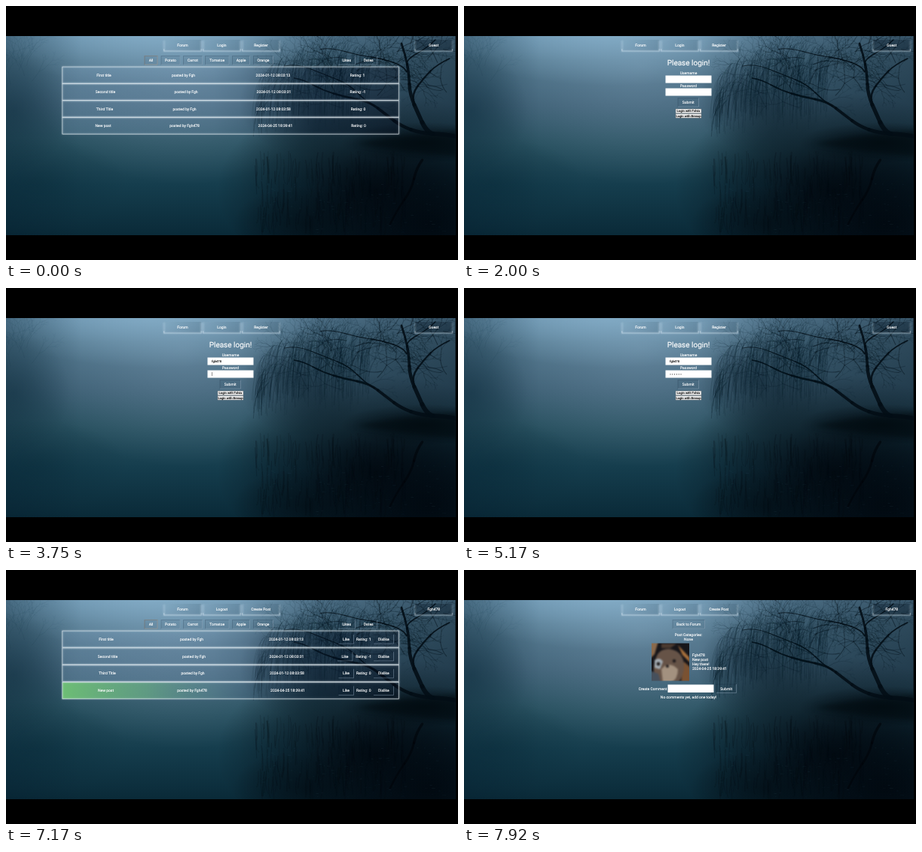
Write an HTML page with a canvas that moves like this. It is 600 px wide and 338 px high and loops after 8000 ms.

```html
<!DOCTYPE html>
<html lang="en">
<head>
<meta charset="utf-8">
<title>Forum demo</title>
<style>
html, body { margin: 0; width: 100%; height: 100%; overflow: hidden; background: #000; }
canvas, svg { position: absolute; left: 0; top: 0; width: 600px; height: 338px; }
text { font-family: Roboto, "Liberation Sans", sans-serif; font-size: 5px;
  text-rendering: geometricPrecision; white-space: pre; stroke-width: .14px; }
.soft { filter: blur(.9px); }
.faint { filter: blur(.5px); }
</style>
</head>
<body>
<canvas id="lake" width="600" height="338"></canvas>
<svg id="ui" viewBox="0 0 600 338">
  <defs>
    <linearGradient id="row">
      <stop offset="0" stop-color="#86a9c8" stop-opacity=".26"/>
      <stop offset=".45" stop-color="#7c9cbc" stop-opacity=".2"/>
      <stop offset=".75" stop-color="#0a1830" stop-opacity=".25"/>
      <stop offset="1" stop-color="#020818" stop-opacity=".35"/>
    </linearGradient>
    <linearGradient id="own">
      <stop offset="0" stop-color="#6fc274" stop-opacity=".95"/>
      <stop offset=".25" stop-color="#68b080" stop-opacity=".65"/>
      <stop offset=".55" stop-color="#5c8a94" stop-opacity="0"/>
    </linearGradient>
    <linearGradient id="btn">
      <stop offset="0" stop-color="#9dbdd4" stop-opacity=".12"/>
      <stop offset="1" stop-color="#0c2436" stop-opacity=".12"/>
    </linearGradient>
    <clipPath id="photo"><rect x="249" y="97.5" width="50" height="50"/></clipPath>
  </defs>
</svg>
<script>
const LOOP = 8000;
const USER = 'Fgh478';
const LOGIN_AT = 1830, MEMBER_AT = 5920, POST_AT = 7250;
const NAME_AT = 2500, PASS_FOCUS = 3500, PASS_AT = 4080, KEY = 150;

/* ---------- misty lake ---------- */
let seed = 7;
function rnd() {
  seed = (seed + 0x6D2B79F5) | 0;
  let n = Math.imul(seed ^ (seed >>> 15), 1 | seed);
  n = (n + Math.imul(n ^ (n >>> 7), 61 | n)) ^ n;
  return ((n ^ (n >>> 14)) >>> 0) / 4294967296;
}
const span = (a, b) => a + (b - a) * rnd();

function paintLake() {
  const c = document.getElementById('lake').getContext('2d');
  const fill = (g, stops) => {
    stops.forEach(([at, col]) => g.addColorStop(at, col));
    c.fillStyle = g;
    c.fillRect(0, 40, 597, 266);
  };
  const haze = (x, y, r, rgb, a, squash = 1) => {
    c.save();
    c.translate(x, y);
    c.scale(1, squash);
    const g = c.createRadialGradient(0, 0, 0, 0, 0, r);
    g.addColorStop(0, `rgba(${rgb},${a})`);
    g.addColorStop(.5, `rgba(${rgb},${a * .5})`);
    g.addColorStop(1, `rgba(${rgb},0)`);
    c.fillStyle = g;
    c.fillRect(-r, -r, 2 * r, 2 * r);
    c.restore();
  };
  const curve = (pts, w0, w1, col) => {
    c.strokeStyle = col;
    c.lineCap = 'round';
    for (let i = 1; i < pts.length - 1; i++) {
      const [a, b, d] = [pts[i - 1], pts[i], pts[i + 1]];
      const k = i / (pts.length - 1);
      c.lineWidth = w0 + (w1 - w0) * k;
      c.beginPath();
      c.moveTo((a[0] + b[0]) / 2, (a[1] + b[1]) / 2);
      c.quadraticCurveTo(b[0], b[1], (b[0] + d[0]) / 2, (b[1] + d[1]) / 2);
      c.stroke();
    }
  };
  const twig = (x, y, ang, len, w, col) => {
    if (len < 4) return;
    const x2 = x + Math.cos(ang) * len, y2 = y + Math.sin(ang) * len;
    c.strokeStyle = col;
    c.lineWidth = w;
    c.beginPath();
    c.moveTo(x, y);
    c.quadraticCurveTo((x + x2) / 2 + span(-3, 3), (y + y2) / 2 + span(-3, 3), x2, y2);
    c.stroke();
    twig(x2, y2, ang + span(-.7, -.1), len * span(.6, .8), w * .72, col);
    twig(x2, y2, ang + span(.1, .7), len * span(.6, .8), w * .72, col);
  };

  c.save();
  c.beginPath();
  c.rect(0, 40, 596.5, 265);
  c.clip();

  fill(c.createLinearGradient(0, 40, 0, 305), [[0, '#628aa4'], [.12, '#4e7389'], [.35, '#3c5e73'],
    [.55, '#28505f'], [.75, '#153d4d'], [1, '#0a2a38']]);
  haze(235, 80, 210, '135,165,190', .4, .75);
  haze(195, 36, 220, '145,188,215', .6, .32);
  fill(c.createLinearGradient(0, 0, 100, 0), [[0, 'rgba(3,28,44,.3)'], [1, 'rgba(3,28,44,0)']]);
  haze(10, 140, 75, '8,40,55', .38, 1.1);
  haze(40, 235, 120, '6,38,52', .35, .5);
  fill(c.createLinearGradient(310, 0, 597, 0), [[0, 'rgba(4,20,32,0)'], [.35, 'rgba(4,20,32,.22)'], [1, 'rgba(4,20,32,.45)']]);
  haze(395, 130, 85, '8,28,40', .5, .8);
  haze(490, 245, 210, '1,8,15', .9, .62);
  haze(560, 290, 170, '1,8,15', .9, .7);
  haze(555, 182, 110, '2,10,16', .85, .25);
  haze(400, 290, 100, '2,12,19', .6, .5);

  // distant left trees
  for (let i = 0; i < 12; i++) twig(span(0, 35), span(70, 130), span(-2, -.9), 17, .8, 'rgba(20,50,68,.15)');

  // far crown
  for (let i = 0; i < 32; i++) twig(span(400, 595), span(55, 135), span(-3.4, .4), 23, 1.1, 'rgba(8,26,38,.3)');
  for (let i = 0; i < 22; i++) twig(span(365, 460), span(65, 110), span(-3.6, -.8), 16, .9, 'rgba(9,30,43,.3)');

  // bank
  c.filter = 'blur(3px)';
  c.fillStyle = 'rgba(3,12,18,.6)';
  c.beginPath();
  c.moveTo(465, 183);
  c.quadraticCurveTo(530, 170, 600, 166);
  c.lineTo(600, 200);
  c.quadraticCurveTo(530, 194, 465, 183);
  c.fill();
  c.filter = 'none';

  // trunks and limbs
  const bark = 'rgba(3,13,21,.88)';
  curve([[610, 176], [585, 171], [550, 169], [525, 160], [505, 145], [482, 127], [450, 121], [420, 112], [395, 98], [370, 94]], 6, .8, bark);
  curve([[572, 174], [557, 165], [548, 145], [536, 118], [535, 90], [530, 65], [520, 35]], 7, 2, bark);
  curve([[545, 140], [538, 118], [555, 95], [572, 78], [605, 62]], 3, 1.4, bark);
  curve([[536, 95], [528, 80], [500, 70], [470, 66], [430, 55], [405, 60]], 2, .6, bark);
  curve([[500, 140], [478, 127], [455, 104], [425, 92], [385, 76], [355, 84]], 2, .5, bark);
  curve([[535, 85], [530, 72], [560, 55], [580, 35]], 2.2, 1, bark);
  for (let i = 0; i < 22; i++) twig(span(430, 590), span(50, 125), span(-3.3, .2), 20, 1.1, 'rgba(4,16,25,.45)');

  // willow strands
  c.lineCap = 'butt';
  for (let i = 0; i < 420; i++) {
    const x = 331 + 150 * Math.pow(rnd(), 1.2);
    const top = 54 + Math.max(0, 410 - x) ** 2 / 140 + span(0, 45);
    const end = Math.min(span(140, 174), top + span(22, 75));
    const dx = span(-5, 2);
    c.strokeStyle = `rgba(6,25,36,${span(.1, .36)})`;
    c.lineWidth = span(.35, .8);
    c.beginPath();
    c.moveTo(x + 7, top - 5);
    c.bezierCurveTo(x, top, x + dx, (top + end) / 2, x + dx + span(-2, 2), end);
    c.stroke();
  }

  // reflections
  for (let i = 0; i < 190; i++) {
    const x = 330 + 200 * rnd(), y = span(192, 280);
    c.strokeStyle = `rgba(1,9,15,${span(.1, .26)})`;
    c.lineWidth = span(.6, 2.2);
    c.beginPath();
    c.moveTo(x, y);
    c.quadraticCurveTo(x + span(-4, 4), y + 18, x + span(-3, 3), y + span(15, 45));
    c.stroke();
  }
  for (let i = 0; i < 130; i++) {
    c.fillStyle = `rgba(50,85,100,${span(.04, .2)})`;
    c.fillRect(span(335, 590), span(235, 303), span(1, 5), .7);
  }
  curve([[560, 195], [545, 215], [538, 245], [520, 270], [500, 310]], 4, 2, 'rgba(0,4,9,.6)');
  c.restore();
}

/* ---------- interface ---------- */
const svg = document.getElementById('ui');
function el(parent, tag, attrs, text) {
  const n = document.createElementNS('http://www.w3.org/2000/svg', tag);
  for (const k in attrs) n.setAttribute(k, attrs[k]);
  if (text !== undefined) n.textContent = text;
  return parent.appendChild(n);
}
const scene = () => el(svg, 'g', {});
const rect = (g, x, y, width, height, more) => el(g, 'rect', { x, y, width, height, ...more });
const line = (g, d, stroke, opacity, width, cls) =>
  el(g, 'path', { d, fill: 'none', stroke, 'stroke-opacity': opacity, 'stroke-width': width, class: cls });

// label with its middle at height y
function label(g, x, y, str, more = {}) {
  const size = more.size || 5, col = more.fill || '#fff';
  return el(g, 'text', { x, y: y + size * .355, 'text-anchor': more.anchor || 'middle',
    style: `font-size:${size}px;fill:${col};stroke:${col}` }, str);
}

function navButton(g, x, str, dark) {
  const [y, w, h] = [45, 49.5, 15];
  rect(g, x, y, w, h, { fill: dark ? '#02101b' : 'url(#btn)', 'fill-opacity': dark ? .3 : 1, class: 'faint' });
  line(g, `M${x},${y + 1}V${y + h}H${x + w}V${y + 1}`, '#dcecf8', dark ? .28 : .36, 1.7, 'soft');
  line(g, `M${x},${y + h - 3}V${y + h}H${x + w}V${y + h - 3}`, '#e4f0fa', .4, 1.2, 'faint');
  label(g, x + w / 2, 52.3, str);
}

function button(g, x, y, w, h, str, active) {
  rect(g, x, y, w, h, { fill: '#061b2e', 'fill-opacity': .05, stroke: '#0a1f33', 'stroke-opacity': .2, 'stroke-width': 1, class: 'faint' });
  line(g, `M${x},${y + h}H${x + w}V${y}`, '#c5dcee', .4, .8, 'faint');
  if (active) rect(g, x, y, w, h, { fill: 'none', stroke: '#a08a78', 'stroke-opacity': .6, 'stroke-width': .7 });
  label(g, x + w / 2, y + h / 2, str);
}

const field = (g, x, y, h) => rect(g, x, y, 61, h, { fill: '#fff' });

function nav(g, second, third, who) {
  ['Forum', second, third].forEach((s, i) => navButton(g, 209.7 + 52 * i, s));
  navButton(g, 543, who, true);
}

function tags(g) {
  [['All', 184, 17], ['Potato', 206, 25], ['Carrot', 235.5, 25], ['Tomatoe', 264.5, 31.5], ['Apple', 300.5, 23],
   ['Orange', 328.5, 26], ['Likes', 441, 22.5], ['Dates', 470, 22.5]]
    .forEach(([s, x, w], i) => button(g, x, 66.5, w, 11.5, s, i === 0));
}

const posts = [
  { title: 'First title', by: 'Fgh', date: '2024-01-12 08:03:13', rate: 1, guest: [130, 235.5, 354.5, 466.5], member: [133, 246.5, 372] },
  { title: 'Second title', by: 'Fgh', date: '2024-01-12 08:03:31', rate: -1, guest: [132, 239, 355.5, 467], member: [135, 249.5, 372.5] },
  { title: 'Third Title', by: 'Fgh', date: '2024-01-12 08:03:58', rate: 0, guest: [131, 237, 355, 467.5], member: [134.5, 248, 373] },
  { title: 'New post', by: USER, date: '2024-04-25 18:39:41', rate: 0, guest: [129, 237, 357.5, 468], member: [132.5, 247, 374] }
];

function table(g, member) {
  const step = member ? 22.8 : 22.45;
  posts.forEach((p, i) => {
    const y = 81 + step * i, mid = y + 11.1;
    const box = [g, 74.8, y, 446.8, 22];
    rect(...box, { fill: 'url(#row)' });
    if (member && p.by === USER) rect(...box, { fill: 'url(#own)' });
    rect(...box, { fill: 'none', stroke: '#e6f2fb', 'stroke-opacity': .4, 'stroke-width': 1.4, class: 'soft' });
    rect(...box, { fill: 'none', stroke: '#f2f8fc', 'stroke-opacity': .75, 'stroke-width': .7 });
    const at = member ? p.member : p.guest;
    label(g, at[0], mid, p.title);
    label(g, at[1], mid, 'posted by ' + p.by);
    label(g, at[2], mid, p.date);
    label(g, member ? 474.7 : at[3], mid, 'Rating: ' + p.rate);
    if (member) {
      button(g, p.rate < 0 ? 440 : 441.5, mid - 6, 20, 12, 'Like');
      button(g, 488, mid - 6, 26.5, 12, 'Dislike');
    }
  });
}

const forum = scene();
nav(forum, 'Login', 'Register', 'Guest');
tags(forum);
table(forum, false);

const login = scene();
nav(login, 'Login', 'Register', 'Guest');
label(login, 298, 75, 'Please login!', { size: 10 });
label(login, 298, 89, 'Username');
field(login, 267.5, 92.5, 10);
label(login, 298, 105.8, 'Password');
field(login, 267.5, 109.5, 10);
button(login, 284, 122.5, 27.5, 11.5, 'Submit');
['Tolvix', 'Brenup'].forEach((s, i) => {
  rect(login, 281, 137 + 6.4 * i, 34, 5.6, { fill: '#efefef', stroke: '#777', 'stroke-width': .4 });
  label(login, 298, 139.9 + 6.4 * i, 'Login with ' + s, { size: 4.17, fill: '#000' });
});
const typed = label(login, 273, 97.6, '', { size: 4.17, fill: '#111', anchor: 'start' });
const dots = [...USER].map((_, i) => el(login, 'circle', { cx: 274 + 2.8 * i, cy: 114.8, r: .6, fill: '#222' }));
const caret = rect(login, 273, 95, .5, 5, { fill: '#222' });

const member = scene();
nav(member, 'Logout', 'Create Post', USER);
tags(member);
table(member, true);

const post = scene();
nav(post, 'Logout', 'Create Post', USER);
button(post, 277, 66.5, 42.5, 11.5, 'Back to Forum');
label(post, 298, 86, 'Post Categories:');
label(post, 298, 91.9, 'None');
const pic = el(el(post, 'g', { 'clip-path': 'url(#photo)' }), 'g', { class: 'soft' });
rect(pic, 245, 93, 58, 59, { fill: '#17161a' });
[['M247,95H258L253,112L247,118Z', '#8a6a4c'], ['M262,98H282L274,104H262Z', '#4a3a30'],
 ['M284,100L299,116L301,124L290,113Z', '#a8703c'], ['M292,122L301,130V150H288Z', '#7a5232'],
 ['M254,120Q257,105 272,105Q289,107 292,124Q293,140 284,150H256Q249,134 254,120Z', '#665347'],
 ['M262,132Q272,120 284,132Q284,146 274,150H264Z', '#a3917f'],
 ['M253,120Q260,115 264,122L260,132L253,130Z', '#a4adb4'],
 ['M247,134L258,138L262,152H247Z', '#46505c']]
  .forEach(([d, fill]) => el(pic, 'path', { d, fill }));
[[258, 125, 2.4], [279, 121, 2.2], [270, 128, 2]].forEach(([cx, cy, r]) => el(pic, 'circle', { cx, cy, r, fill: '#211d1e' }));
[USER, 'New post', 'Hey there!', '2024-04-25 18:39:41']
  .forEach((s, i) => label(post, 303, 113.5 + 5.85 * i, s, { anchor: 'start' }));
label(post, 250.5, 157.8, 'Create Comment');
field(post, 270.5, 152.5, 10.5);
button(post, 335, 152, 26.5, 11.5, 'Submit');
label(post, 298, 169, 'No comments yet, add one today!');

/* ---------- playback ---------- */
const scenes = [[forum, 0], [login, LOGIN_AT], [member, MEMBER_AT], [post, POST_AT], [null, LOOP]];
const keys = (t, from) => Math.max(0, Math.min(USER.length, Math.floor((t - from) / KEY) + 1));

function render(t) {
  for (let i = 0; i < 4; i++)
    scenes[i][0].style.display = t >= scenes[i][1] && t < scenes[i + 1][1] ? '' : 'none';
  const n = keys(t, NAME_AT), m = keys(t, PASS_AT), inPass = t >= PASS_FOCUS;
  typed.textContent = USER.toLowerCase().slice(0, n);
  dots.forEach((d, i) => d.style.display = i < m ? '' : 'none');
  const focusAt = inPass ? PASS_FOCUS : 2250;
  const lit = t >= focusAt && t < 4950 && (t - focusAt) % 1000 < 500;
  caret.style.display = lit ? '' : 'none';
  caret.setAttribute('x', 273 + (inPass ? 2.8 * m : 2.25 * n));
  caret.setAttribute('y', inPass ? 112 : 95);
}

paintLake();
const start = performance.now();
function tick() {
  render((performance.now() - start) % LOOP);
  requestAnimationFrame(tick);
}
tick();
</script>
</body>
</html>
```
